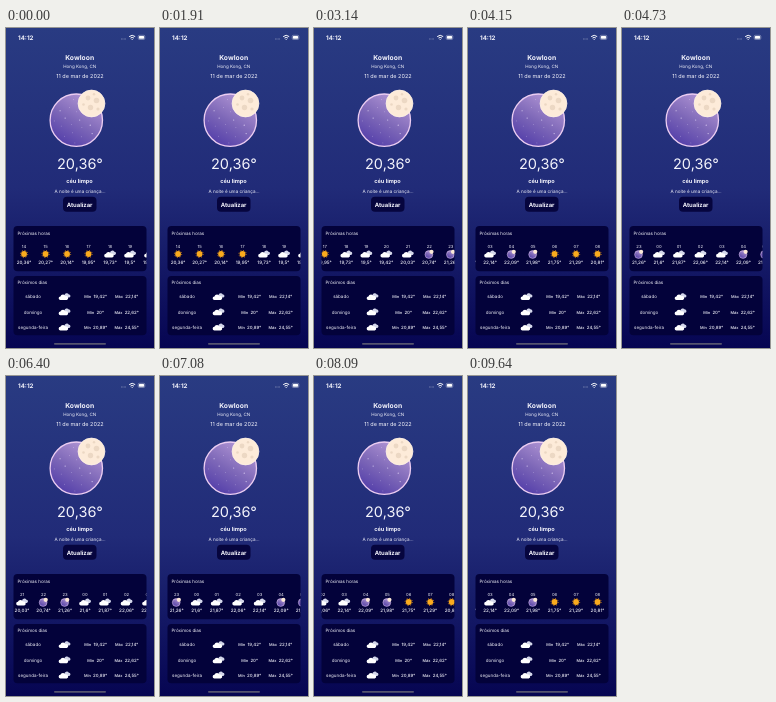
An HTML page that plays this animation: 148x320 px, repeating every 9740 ms.

```html
<!DOCTYPE html>
<html lang="pt">
<head>
<meta charset="utf-8">
<style>
  html, body { margin: 0; width: 100%; height: 100%; overflow: hidden; background: #171b57; }
  svg { display: block; width: 100vw; height: 100vh; }
  text { font-family: Inter, "Open Sans", sans-serif; fill: #f4f4fc; text-anchor: middle; text-rendering: geometricPrecision; }
  .b { font-weight: 700; }
  .l { text-anchor: start; }
</style>
</head>
<body>
<svg id="stage" viewBox="0 0 148 320">
  <defs>
    <linearGradient id="sky" x2="0" y2="1">
      <stop stop-color="#293b82"/><stop offset=".5" stop-color="#212b78"/>
      <stop offset="1" stop-color="#060552"/>
    </linearGradient>
    <linearGradient id="violet" x1=".75" y1=".1" x2=".25" y2=".95">
      <stop stop-color="#ad92d2"/><stop offset=".5" stop-color="#7e68b8"/><stop offset="1" stop-color="#5540aa"/>
    </linearGradient>
    <clipPath id="window"><rect x="7.5" y="198" width="133" height="45.3" rx="4"/></clipPath>
    <g id="cloud">
      <path d="M0 -1a2.3 2.3 0 0 1 4.3 -1.2a1.6 1.6 0 0 1 .6 3.1h-4z" fill="#d3d6ea"/>
      <path d="M-4 3.4a1.8 1.8 0 0 1 -.1 -3.6a2.8 2.8 0 0 1 5.2 -.2a1.9 1.9 0 0 1 1.2 3.8z" fill="#fff"/>
    </g>
    <g id="sun">
      <circle r="3.6" fill="none" stroke="#d88a18" stroke-width=".9" stroke-dasharray="1.1 1.727"/>
      <circle r="2.9" fill="#fbab1d"/>
    </g>
    <g id="moon">
      <circle cx="-.4" cy=".5" r="3.9" fill="url(#violet)" stroke="#e6cdf0" stroke-width=".5"/>
      <circle cx="2.2" cy="-2.2" r="2.1" fill="#fbe8d6"/>
    </g>
  </defs>

  <rect width="148" height="320" fill="url(#sky)"/>

  <text class="b l" x="12" y="11.8" font-size="6.2">14:12</text>
  <path d="M115 11h5" stroke="#fff" stroke-width=".9" stroke-dasharray=".9 .5" opacity=".4"/>
  <g fill="none" stroke="#fff" stroke-width="1">
    <path d="M123.2 8.6q3 -2.6 6 0M124.5 10.1q1.7 -1.4 3.4 0"/>
    <path d="M126.2 11.2v.7" stroke-width="1.2"/>
    <rect x="132.2" y="7.3" width="6.6" height="4.2" rx="1.2" stroke-width=".5" opacity=".7"/>
  </g>
  <rect x="132.9" y="8" width="5.2" height="2.8" rx=".7" fill="#fff"/>

  <text class="b" x="73.7" y="32.3" font-size="6.8">Kowloon</text>
  <text x="73.7" y="39.7" font-size="4.5">Hong Kong, CN</text>
  <text x="74" y="50" font-size="5.5">11 de mar de 2022</text>

  <circle cx="70.3" cy="92.2" r="26.2" fill="url(#violet)" stroke="#eccdf2" stroke-width="1.3"/>
  <g id="stars" fill="#eee4ff"></g>
  <circle cx="85.5" cy="75.5" r="13.4" fill="#fdebd9" stroke="#fff3e6" stroke-width=".8"/>
  <g fill="#ecd8c4">
    <circle cx="82" cy="70" r="2.4"/><circle cx="90.5" cy="72.5" r="2.8"/>
    <circle cx="84.5" cy="79.5" r="2.7"/><circle cx="92" cy="81" r="1.6"/>
    <circle cx="77.5" cy="76.5" r="1.3"/><circle cx="88" cy="66.3" r="1.2"/>
  </g>

  <text x="74" y="140.8" font-size="14.5">20,36°</text>
  <text class="b" x="73.5" y="154.6" font-size="5.6">céu limpo</text>
  <text x="74" y="165" font-size="4.6">A noite é uma criança...</text>
  <rect x="57" y="168.8" width="33.5" height="15" rx="4" fill="#06053e"/>
  <text class="b" x="73.6" y="178.5" font-size="5.9">Atualizar</text>

  <g fill="#03023a">
    <rect x="7.5" y="198" width="133" height="45.3" rx="4"/>
    <rect x="7.5" y="248" width="133" height="59.3" rx="4"/>
  </g>
  <text class="l" x="11.5" y="206.5" font-size="4.5">Próximas horas</text>
  <text class="l" x="11.5" y="256.4" font-size="4.5">Próximos dias</text>
  <g clip-path="url(#window)"><g id="hours"></g></g>
  <g id="days"></g>
  <rect x="48" y="315" width="52" height="1.7" rx=".85" fill="#55546f"/>
</svg>
<script>
const $ = id => document.getElementById(id);
const icon = (name, x, y) => `<use href="#${name}" x="${x}" y="${y}"/>`;
const label = (text, x, y, size, weight = 400) =>
  `<text x="${x}" y="${y}" font-size="${size}" font-weight="${weight}">${text}</text>`;

// Small stars spread over the planet on a golden-angle spiral
$('stars').innerHTML = Array.from({ length: 20 }, (_, i) => {
  const a = i * 2.4, r = 5.2 * Math.sqrt(i + .5);
  return `<circle cx="${70 + r * Math.cos(a)}" cy="${92 + r * Math.sin(a)}" r="${i % 4 ? .35 : .6}" opacity=".8"/>`;
}).join('');

// Hourly forecast, starting at 14h
const temps = ('20,36 20,27 20,14 19,95 19,73 19,5 19,42 20,03 20,74 21,26 ' +
  '21,6 21,87 22,06 22,14 22,09 21,98 21,75 21,29 20,81').split(' ');
const kinds = { s: 'sun', c: 'cloud', m: 'moon' };
const sky = 'ssssccccmmccccmmsss';
let edge = 10.8;
$('hours').innerHTML = temps.map((temp, i) => {
  const width = temp.length > 4 ? 14.5 : 11.5, x = edge + width / 2;
  edge += width + 7;
  const hour = String((14 + i) % 24).padStart(2, '0');
  return label(hour, x, 219.6, 4.2) + icon(kinds[sky[i]], x, 226) +
    label(temp + '°', x, 235.6, 4.6, 500);
}).join('');

const days = [['sábado', '19,42', '22,14'], ['domingo', '20', '22,62'], ['segunda-feira', '20,89', '24,55']];
const range = (name, value, x, y) =>
  label(`<tspan font-size="3.9">${name}</tspan>&#160; ${value}°`, x, y, 4.4, 500);
$('days').innerHTML = days.map(([day, min, max], i) => {
  const y = 270.4 + i * 15.2;
  return label(day, 27, y, 4.5) + icon('cloud', 58.5, y - 1.8) +
    range('Mín', min, 89.6, y) + range('Máx', max, 120.6, y);
}).join('');

// Flicks: start (ms) and where the scroll would coast to; the list stops at its end
const flicks = [[3020, 350], [4190, 148], [6837, 272]];
const LOOP = 9740, STEP = LOOP / 87, GLIDE = 500, LIST_END = 269.5;
function scrollAt(t) {
  let x = 0;
  flicks.forEach(([start, goal], i) => {
    const end = i + 1 < flicks.length ? flicks[i + 1][0] : LOOP;
    const time = Math.max(0, Math.min(t, end) - start);
    x = Math.min(LIST_END, goal + (x - goal) * Math.exp(-time / GLIDE));
  });
  return x;
}
function draw() {
  // The picture advances about nine times a second
  const t = Math.floor(performance.now() % LOOP / STEP) * STEP;
  $('hours').setAttribute('transform', `translate(${-scrollAt(t)} 0)`);
  requestAnimationFrame(draw);
}
draw();
</script>
</body>
</html>
```
